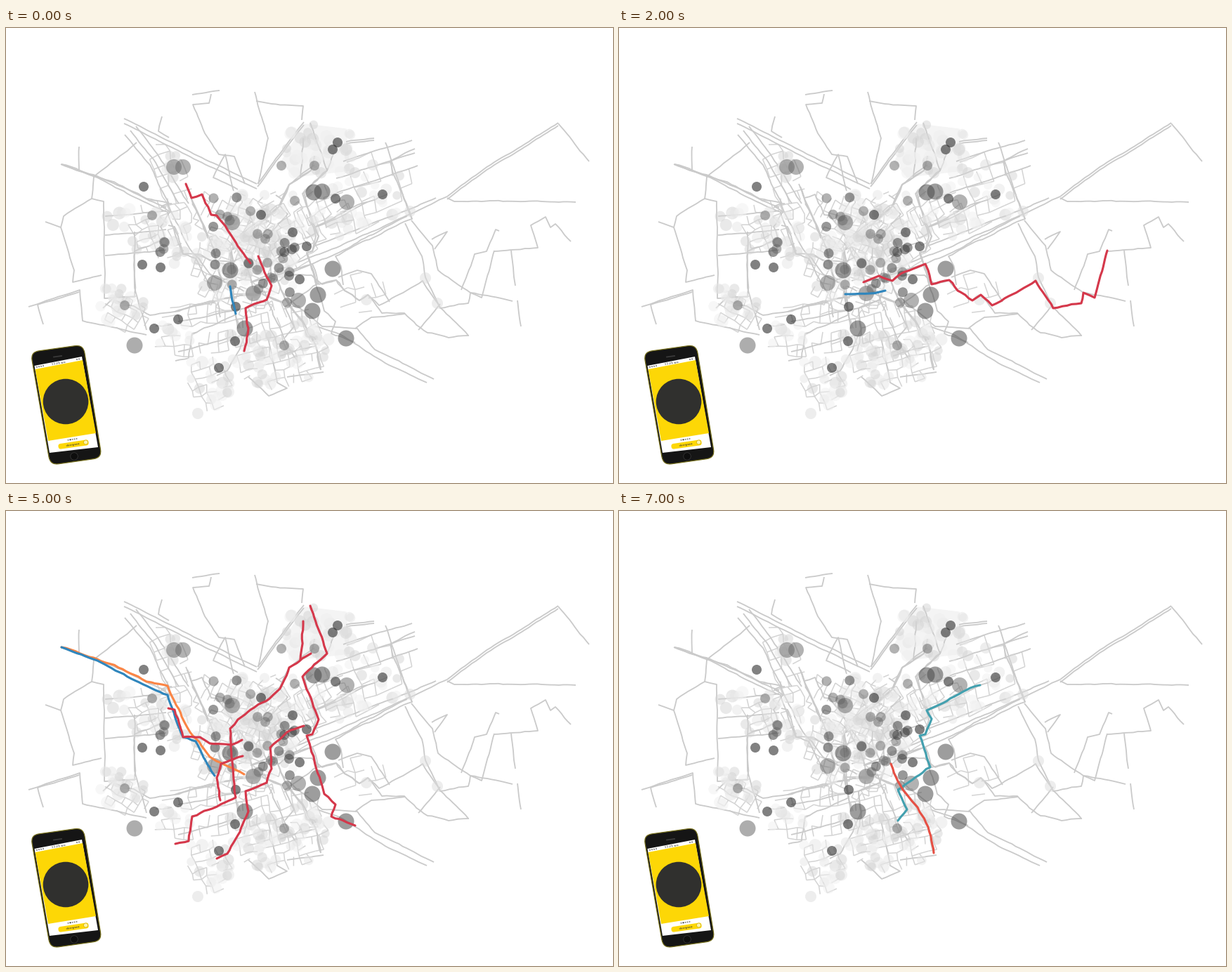
Animation, 864 px wide and 648 px high, one loop 8 s. Source, as a matplotlib script:

```python
import matplotlib.pyplot as plt
import numpy as np
from matplotlib.animation import FuncAnimation
from matplotlib.collections import LineCollection, PatchCollection
from matplotlib.patches import Circle, PathPatch, Polygon
from matplotlib.path import Path

W, H, PX = 864, 648, 0.72
RED, BLUE, ORANGE = "#d5384b", "#2f86bd", "#fb8545"
CORAL, TEAL, SAND = "#e65044", "#43a0af", "#fdb567"
rng = np.random.default_rng(12)

fig = plt.figure(figsize=(W / 100, H / 100), dpi=100, facecolor="white")
ax = fig.add_axes([0, 0, 1, 1])
ax.set_xlim(0, W)
ax.set_ylim(H, 0)
ax.axis("off")

roads, trips = [], [[] for _ in range(8)]


def wander(xy, step):
    """Join key points by random walks pinned at both ends."""
    pts = np.array(xy, float).reshape(-1, 2)
    out = [pts[:1]]
    for a, b in zip(pts, pts[1:]):
        n = max(1, int(np.hypot(*(b - a)) / 6))
        t = np.linspace(0, 1, n + 1)[1:, None]
        walk = np.cumsum(rng.normal(0, step, (n, 2)), axis=0)
        out.append(a + (b - a) * t + walk - walk[-1] * t)
    return np.vstack(out)


def road(*xy, lanes=1, gap=4):
    line = wander(xy, 0.3)
    for k in range(lanes):
        roads.append(line + [0, gap * k])


def trip(scene, color, *xy):
    trips[scene].append((color, wander(xy, 0.6)))


# West
road(32, 397, 105, 373, 109, 417, 200, 437)
road(53, 422, 45, 394, 104, 376)
road(56, 276, 78, 284, 97, 345, 95, 362, 136, 352)
road(78, 284, 82, 268, 122, 243, 139, 247, 141, 350, 140, 385, 186, 382)
road(78, 194, 130, 212, 228, 256)
road(104, 202, 104, 169)
road(122, 243, 125, 212, 186, 163)
road(200, 430, 183, 370, 183, 290)
for y in (268, 295, 324):
    road(141, y, 228, y - 8)
# North
road(168, 129, 240, 165, 357, 222, lanes=2, gap=7)
for k in range(3):
    road(169 + 8 * k, 152 - 6 * k, 205 + 5 * k, 195 - 8 * k, 232 + 14 * k, 250)
road(222, 126, 217, 147, 232, 156)
road(304, 89, 265, 95)
road(292, 94, 289, 107, 266, 109, 283, 150, 303, 180, 325, 183, 340, 222)
road(324, 232, 312, 180, 295, 213, 330, 230)
road(354, 91, 373, 157, 359, 222)
road(356, 104, 378, 108, 423, 111, 421, 131)
road(424, 134, 400, 165, 358, 222, lanes=2)
road(484, 162, 524, 157, lanes=2, gap=3)
# East
road(786, 135, 700, 188, 628, 240, lanes=2)
road(628, 240, 576, 265, 470, 313, 400, 340)
road(612, 242, 500, 287, 440, 310)
road(628, 242, 638, 247, 811, 248)
road(786, 136, 798, 150, 830, 190)
road(540, 163, 578, 272)
for k in range(3):
    road(578 + 4 * k, 160 + 18 * k, 480 - 10 * k, 190 + 24 * k)
road(568, 278, 592, 325, 597, 355, 618, 398)
road(577, 274, 607, 310, 615, 345, 661, 377, 721, 389)
road(606, 301, 628, 290, 610, 315)
road(648, 373, 667, 322, 684, 318, 697, 287, 702, 289)
road(694, 318, 757, 313, 747, 281, 768, 269, 775, 284, 782, 279, 804, 304)
road(719, 317, 725, 367)
road(728, 388, 733, 425)
# South
road(618, 398, 658, 438)
road(587, 430, 618, 393)
road(395, 378, 450, 425, 500, 428, 525, 458, 609, 500)
road(440, 425, 475, 436, 545, 480, 599, 505)
road(497, 428, 520, 412, 568, 407)
road(473, 355, 500, 345, 520, 350, 546, 390)
road(245, 418, 341, 399)
road(245, 461, 320, 440)
road(345, 497, 374, 524, 400, 513, 386, 505, 372, 440)
road(400, 497, 452, 490)

# Corridors shared by several trips
EAST = [440, 345, 445, 365, 470, 359, 482, 374, 503, 388, 515, 380, 531, 395]
RING = [394, 391, 365, 379, 333, 381, 240, 404, 205, 409, 182, 396, 162, 396]
CANAL = [270, 258, 293, 308, 308, 361, 319, 364, 330, 428]
BRIDGE = [378, 367, 371, 387, 341, 399, 345, 428]
PARK = [434, 203, 403, 223, 390, 253]
SPUR = [436, 318, 428, 320, 443, 365]
SOUTH = [397, 385, 425, 422, 440, 450, 448, 487]

# One group of trips per second
trip(0, RED, 256, 222, 264, 242, 279, 237, 292, 266, 300, 267, 348, 335)
trip(0, RED, 359, 325, *BRIDGE, 339, 460)
trip(0, BLUE, 319, 368, 327, 407)

trip(1, RED, 470, 169, 457, 203, 424, 235, 441, 297, *SPUR)
trip(1, RED, 542, 237, 514, 248, 438, 284)
trip(1, BLUE, *RING[:8])

trip(2, RED, 348, 362, 370, 353, 389, 360, 401, 350, 436, 336, *EAST,
     593, 360, 618, 399, 658, 392, 661, 377, 677, 384, 695, 317)
trip(2, BLUE, 322, 379, 357, 378, 379, 374)

trip(3, RED, 571, 268, 469, 322, 436, 336, 348, 362)
trip(3, RED, 439, 182, *PARK, 353, 283)
trip(3, BLUE, 321, 316, 325, 350, 320, 363)

trip(4, CORAL, 258, 226, *CANAL)
trip(4, CORAL, 258, 226, 287, 299, 298, 295, 318, 317, 329, 313, 348, 355,
     352, 376, 368, 375, 402, 455, 414, 473)
trip(4, CORAL, 390, 467, 440, 453)
trip(4, CORAL, 382, 346, *SOUTH)
trip(4, CORAL, 439, 195, *PARK[2:], 401, 265, 361, 310, 361, 336)
trip(4, TEAL, *RING)
trip(4, SAND, 343, 348, 341, 357, 331, 360)

trip(5, ORANGE, 79, 194, 130, 211, 200, 243, 230, 249, 262, 315, 290, 350, 339, 375)
trip(5, BLUE, 79, 194, 130, 213, 230, 262, 252, 322, 270, 328, 297, 377)
trip(5, RED, 231, 281, 240, 283, 252, 322, 276, 322, 290, 331, 321, 333, 336, 326)
trip(5, RED, *PARK, 330, 297, 319, 310, 321, 350, 327, 408, 265, 435, 260, 470, 241, 474)
trip(5, RED, 423, 157, 419, 212)
trip(5, RED, 433, 135, 457, 203, 422, 236, 445, 297, *SPUR[:4], 453, 403, 469, 418, 463, 435, 497, 448)
trip(5, RED, 424, 306, 400, 315, 376, 337, *BRIDGE, 315, 488, 300, 495)
trip(5, RED, 337, 349, 306, 360, 300, 380, 305, 412)

trip(6, RED, 236, 250, 221, 254, 233, 262, 220, 283, 226, 299, 205, 310, 183, 318, 183, 383, 155, 383, 138, 399)
trip(6, RED, 265, 250, *CANAL)
trip(6, RED, 384, 238, 393, 244, 388, 255, 350, 287, 358, 306)
trip(6, RED, 393, 342, 402, 353, 435, 352, 450, 365, *EAST[4:12], 535, 406, 567, 406, 600, 434, 630, 441, 659, 438)
trip(6, BLUE, 582, 172, 547, 190, 578, 272, 469, 325, 478, 347, 480, 366)
trip(6, BLUE, 340, 300, 321, 316, 325, 350, 320, 363)

trip(7, TEAL, 514, 248, 500, 252, 438, 284, 445, 296, *SPUR, 397, 397, 410, 425, 397, 441)
trip(7, CORAL, 387, 360, *SOUTH)


def streets(cx, cy, w, h, angle, step, keep=0.6):
    """Broken, jittered street grid inside a turned ellipse."""
    nx, ny = int(w / step) + 1, int(h / step) + 1
    gx, gy = np.meshgrid(np.linspace(-w / 2, w / 2, nx), np.linspace(-h / 2, h / 2, ny))
    gx = gx + rng.normal(0, step * 0.13, gx.shape)
    gy = gy + rng.normal(0, step * 0.13, gy.shape)
    inside = (2 * gx / w) ** 2 + (2 * gy / h) ** 2 < 1.35
    c, s = np.cos(np.radians(angle)), np.sin(np.radians(angle))
    p = np.dstack([cx + gx * c - gy * s, cy + gx * s + gy * c])
    lines = []
    for j in range(ny):
        for i in range(nx):
            for jj, ii in ((j, i + 1), (j + 1, i)):
                if jj < ny and ii < nx and inside[j, i] and inside[jj, ii] and rng.random() < keep:
                    lines.append([p[j, i], p[jj, ii]])
    return lines


# Districts: centre, size, turn, street spacing
DISTRICTS = [
    (325, 275, 110, 80, 25, 9), (222, 285, 85, 80, -18, 11), (330, 350, 125, 110, 20, 10),
    (395, 290, 80, 110, -30, 10), (445, 268, 85, 65, -25, 12), (510, 235, 135, 100, -20, 17),
    (505, 378, 70, 55, -15, 14), (170, 408, 65, 45, 30, 10), (275, 428, 130, 70, -5, 13),
    (290, 507, 55, 72, -20, 11), (390, 450, 125, 120, -15, 11), (232, 215, 55, 100, -20, 13),
]
small = [seg for d in DISTRICTS for seg in streets(*d)]
paths = [p for scene in trips for _, p in scene]

ax.add_patch(Polygon([(425, 137), (484, 144), (489, 203), (410, 212), (392, 190)], color="#f4f4f4", zorder=0))
ax.add_collection(LineCollection(small, colors="#d3d3d3", linewidths=1.5 * PX, zorder=1))
ax.add_collection(LineCollection(roads + paths, colors="#cacaca", linewidths=1.8 * PX, zorder=1))


def discs(radius, color, alpha, spots):
    shapes = [Circle(p, radius) for p in np.reshape(spots, (-1, 2))]
    ax.add_collection(PatchCollection(shapes, facecolor=color, alpha=alpha, linewidth=0, zorder=2))


def cloud(cx, cy, sx, sy, n):
    return np.clip(rng.normal(0, 1, (n, 2)), -1.9, 1.9) * (sx, sy) + (cx, cy)


# Faint counting points: centre, spread, number
PALE = [
    (340, 310, 36, 38, 120), (445, 172, 24, 18, 36), (520, 240, 30, 20, 20), (450, 272, 28, 20, 18),
    (222, 300, 22, 24, 26), (165, 268, 14, 8, 8), (165, 400, 16, 16, 24), (235, 432, 18, 10, 8),
    (370, 465, 32, 22, 45), (435, 440, 15, 16, 14), (290, 510, 14, 18, 18), (235, 190, 10, 14, 8),
]
for place in PALE:
    for spot in cloud(*place):
        discs(rng.uniform(6, 9), rng.choice(["#f0f0f0", "#e6e6e6", "#d4d4d4"]), 0.5, spot)
discs(8, "#dcdcdc", 0.5, [614, 392, 575, 261, 513, 387, 597, 356, 273, 549, 522, 195])

# Strong points: the outlying ones are placed, the crowded ones scattered
discs(11.5, "#777777", 0.6, [183, 452])
discs(11.5, "#444444", 0.52, [438, 234, 450, 233, 465, 343, 444, 380, 484, 442, 340, 428, 319, 345, 436, 403])
discs(11, "#666666", 0.5, [485, 248, 322, 277, 239, 198, 252, 198, 416, 388, 297, 363, 352, 378])
discs(7, "#222222", 0.57, [196, 226, 536, 237, 469, 243, 472, 163, 465, 173, 428, 311, 408, 291, 418, 358,
                           194, 337, 220, 341, 245, 415, 211, 428, 326, 446, 303, 484, 327, 397, 363, 266])
for place in ((310, 262, 20, 11, 7), (350, 335, 32, 22, 20), (228, 308, 8, 6, 4), (395, 315, 9, 7, 5)):
    for spot in cloud(*place):
        discs(7, rng.choice(["#333333", "#666666"]), 0.5, spot)
discs(7, "#666666", 0.5, [208, 267, 411, 246, 439, 196, 392, 196, 396, 452, 169, 395, 400, 391])


# Phone
def rounded(corners, radius, **style):
    pts = np.array(corners, float)
    verts, codes = [], []
    for i, p in enumerate(pts):
        before, after = (p + (q - p) / np.hypot(*(q - p)) * radius
                         for q in (pts[i - 1], pts[(i + 1) % len(pts)]))
        verts += [before, p, after]
        codes += [Path.LINETO, Path.CURVE3, Path.CURVE3]
    codes[0] = Path.MOVETO
    ax.add_patch(PathPatch(Path(verts + verts[:1], codes + [Path.CLOSEPOLY]), **style))


def flat(color, *xy):
    ax.add_patch(Polygon(np.reshape(xy, (-1, 2)), facecolor=color, linewidth=0, zorder=6))


def dot(x, y, r, color, **style):
    ax.add_patch(Circle((x, y), r, **{"facecolor": color, "linewidth": 0, "zorder": 7, **style}))


def tiny(x, y, text):
    ax.text(x, y, text, fontsize=3.1, rotation=8.5, ha="center", va="center",
            color="#333333", family="DejaVu Sans", zorder=8)


rounded([(35, 461.5), (110, 451), (136.5, 612), (63, 622.5)], 12,
        facecolor="#151515", edgecolor="#77701c", linewidth=1.2 * PX, zorder=5)
flat("#ffffff", 40.5, 481, 108, 468, 131, 597, 62, 605)
flat("#fdd706", 41.5, 486, 109, 473, 128, 577, 60, 588)
dot(85, 532, 32.3, "#30302e")
ax.plot([68, 79], [468.5, 467], color="#3a3a3a", lw=1.8 * PX, zorder=7)
dot(97, 610, 5.3, "#0e0e0e", edgecolor="#343434", linewidth=0.8 * PX)
rounded([(74, 592.5), (117, 586), (118, 594), (75, 600)], 3.5, facecolor="#fdd706", linewidth=0, zorder=6)
dot(113.5, 590, 3, "#fff3a8", edgecolor="#c9a800", linewidth=0.6 * PX)
for k in range(5):
    dot(88.5 + 3 * k, 586.8 - 0.45 * k, 1, "#222222" if k == 1 else "#888888")
for x in (44, 47, 50, 53, 101, 104):
    dot(x, 482.8 - 0.19 * (x - 44), 0.9, "#555555")
tiny(75, 477.3, "11:25 am")
tiny(96, 594, "doorgaan")

layers = []
for scene in trips:
    layer = LineCollection([p for _, p in scene], colors=[c for c, _ in scene], linewidths=3.1 * PX,
                           capstyle="round", joinstyle="round", zorder=4, visible=False)
    layers.append(ax.add_collection(layer))


def draw(i):
    for k, layer in enumerate(layers):
        layer.set_visible(k == i)
    return layers


anim = FuncAnimation(fig, draw, frames=8, interval=1000, repeat=True, repeat_delay=0, blit=False)
plt.show()
```
